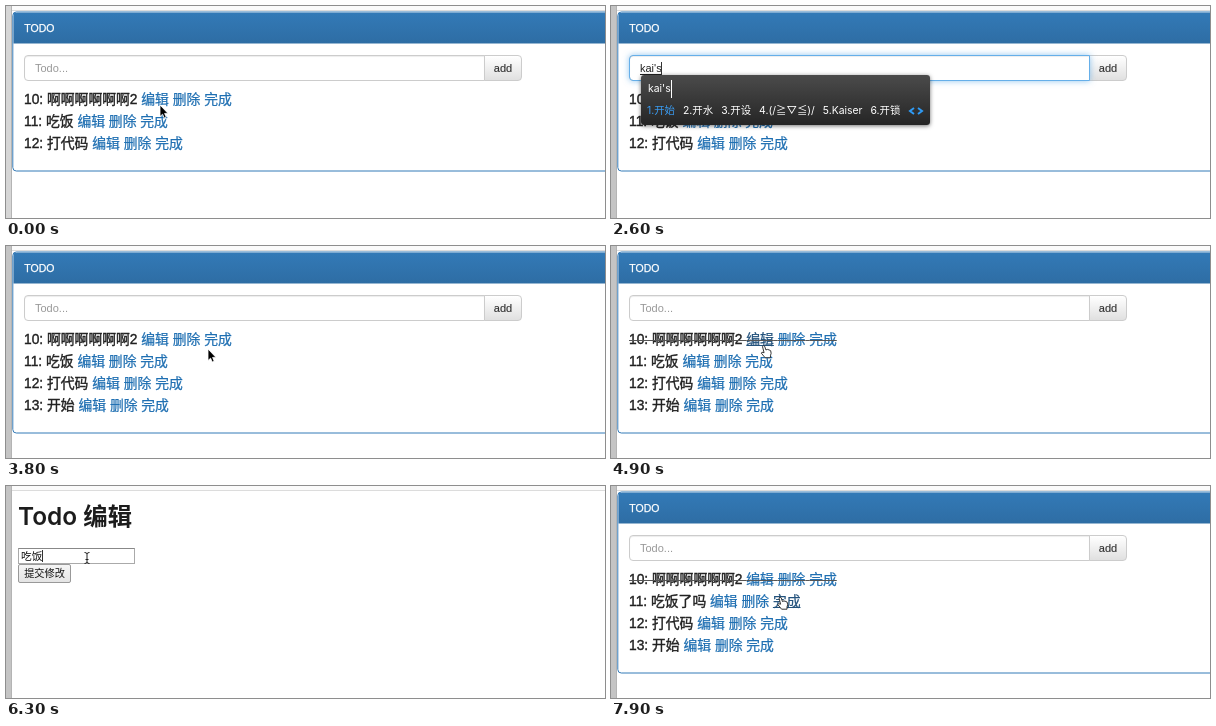
An HTML page for the animation above (8000 ms loop, 599x212 px).

```html
<!DOCTYPE html>
<html lang="zh">
<head>
<meta charset="utf-8">
<style>
html, body { margin: 0; width: 100%; height: 100%; overflow: hidden; background: #fff; }
#stage { position: relative; width: 599px; height: 212px; overflow: hidden;
  font: 11px "Liberation Sans", "Noto Sans CJK SC", sans-serif; color: #222; }
#stage * { box-sizing: border-box; white-space: pre; }
#stage > * { position: absolute; }
.side { left: 0; top: 0; width: 6px; height: 212px; border-right: 1px solid #b4b4b4; }
.top { left: 6px; top: 0; width: 593px; height: 5px; background: #fbfbfb; border-bottom: 1px solid #dcdcdc; }
.panel { left: 6px; top: 5px; width: 610px; border: 1px solid #337ab7; border-radius: 4px; overflow: hidden;
  transform: translate(.3px, .5px); }
.head { height: 31px; padding-left: 11px; font-size: 10.5px; line-height: 30px; color: #fff;
  -webkit-text-stroke: .25px; background: linear-gradient(#337ab7, #2e6da4); }
.input { left: 18px; top: 49px; width: 461px; height: 26px; padding-left: 10px; line-height: 25px;
  border: 1px solid #ccc; border-radius: 4px 0 0 4px; background: #fff; box-shadow: inset 0 1px 1px rgba(0,0,0,.075); }
.glow { left: 18px; top: 49px; width: 461px; height: 26px; border: 1px solid #66afe9;
  border-radius: 4px 0 0 4px; box-shadow: 0 0 6px rgba(102,175,233,.7); }
.add { left: 478px; top: 49px; width: 38px; height: 26px; line-height: 25px; text-align: center; color: #333;
  -webkit-text-stroke: .15px; border: 1px solid #ccc; border-radius: 0 4px 4px 0;
  background: linear-gradient(#fff, #e0e0e0); }
.row { left: 18px; font-size: 13.8px; line-height: 22px; -webkit-text-stroke: .4px; }
.done { text-decoration: line-through 1px #555; }
.row a { color: #1f6fb2; -webkit-text-stroke: .25px; }
.row a.over { color: #23527c; text-decoration: underline 1px; }
.hint { color: #999; }
u { text-decoration: underline 1px; text-underline-offset: 2px; }
.caret { width: 1px; background: #333; }
h1 { left: 12px; top: 15px; margin: 0; font: 600 24.4px/30px Inter, "Noto Sans CJK SC", sans-serif; color: #1c1c1c; }
.field { left: 12px; top: 62px; width: 117px; height: 16px; padding-left: 2px; font-size: 10.7px; line-height: 14px;
  border: 1px solid #aaa; border-top-color: #888; color: #111; }
.send { left: 12px; top: 78px; width: 53px; height: 19px; font-size: 10.2px; line-height: 17px; text-align: center;
  border: 1px solid #999; border-radius: 2px; background: linear-gradient(#f5f5f5, #e4e4e4); color: #111; }
.ime { height: 50px; padding: 0 6px; border-radius: 3px; color: #fff; background: linear-gradient(#4b4b4b, #252525);
  box-shadow: 0 1px 4px rgba(0,0,0,.55); font: 10.4px Inter, "Noto Sans CJK SC", sans-serif; }
.ime p { margin: 0; height: 23px; line-height: 27px; padding-left: 1px; }
.ime i { display: inline-block; width: 1px; height: 18px; background: #fff; vertical-align: middle; }
.ime div { display: flex; gap: 8px; line-height: 25px; }
.ime div :first-child { color: #3a9cf2; }
.ime svg { width: 16px; height: 10px; margin-top: 8px; }
#stage > .mouse { left: 0; top: 0; width: 599px; height: 212px; }
</style>
</head>
<body>
<div id="stage"></div>
<script>
const stage = document.getElementById('stage');
const LOOP = 8000, STEP = 100;
const LINKS = ['编辑', '删除', '完成'];

// Typed letters and their candidates
const TYPING = [
  [0, ''],
  [2000, 'k', '看 可 卡 快 开 口'],
  [2100, 'ka', '卡 咖 喀 咔 看 开'],
  [2400, 'kai', '开 凯 楷 慨 开始 开心'],
  [2500, "kai's", '开始 开水 开设 (/≧▽≦)/ Kaiser 开锁'],
  [2700, "kai'sh", '开始 开水 开设 开山 开审 开'],
  [2800, "kai'shi", '开始 开市 开释 开 凯 楷'],
  [3000, ''],
  [6500, 'l', '了 来 里 老 两'],
  [6600, 'le', '了 乐 勒 雷 了吗'],
  [6700, "le'ma", '了吗 了嘛 乐 了 勒'],
  [6900, '']
];

// Time, position, pointer: a = arrow, i = text beam, h + row + link = hand
const PATH = [
  [0, 154, 99, 'a'], [400, 157, 106, 'a'], [800, 160, 97, 'h00'], [1000, 163, 82, 'a'],
  [1100, 165, 73, 'i'], [1300, 166, 67, 'i'], [2000, 166, 67, ''], [3400, 174, 76, 'a'],
  [3800, 202, 103, 'a'], [4000, 208, 98, 'h02'], [4400, 208, 97, 'h02'], [4600, 185, 98, 'h01'],
  [4800, 153, 99, 'h00'], [5100, 151, 101, 'a'], [5400, 120, 110, 'h11'], [5600, 92, 111, 'h10'],
  [6000, 88, 110, 'a'], [6200, 81, 72, 'i'], [6500, 81, 72, ''], [7000, 81, 72, 'i'],
  [7100, 62, 80, 'a'], [7300, 42, 87, 'a'], [7500, 50, 92, 'a'], [7800, 169, 111, 'h12'], [8000, 169, 111, 'h12']
];
const CLICKS = [1300, 4200, 5800, 6200, 7300];

const POINTERS = {
  a: '<path d="M0 0V11.5L2.6 9.2 4.2 13 6.2 12.2 4.6 8.4H8Z" fill="#000" stroke="#fff" stroke-width=".8"/>',
  i: '<path d="M-2.5-5.5Q0-5.5 0-4Q0-5.5 2.5-5.5M0-4V4M-2.5 5.5Q0 5.5 0 4Q0 5.5 2.5 5.5M-1.5 1.5H1.5" fill="none" stroke="#222"/>',
  h: '<path d="M-1 1Q0-.6 1.2.8L2.4 4.4 4 3.9 5.6 4.4 7.2 5.2Q8.2 8 7 10V12.2H1.6L-2.2 7.6Q-2.2 6 .6 7.2Z" ' +
     'fill="#fff" stroke="#222" stroke-width=".9" stroke-linejoin="round"/>'
};

const last = (list, t) => list.findLastIndex(e => e[0] <= t);
const div = (cls, style, body = '') => `<div class="${cls}" style="${style}">${body}</div>`;
const caret = (x, y, h) => div('caret', `left:${x}px;top:${y}px;height:${h}px`);

const ruler = document.createElement('canvas').getContext('2d');
function textWidth(text, size) {
  ruler.font = `${size}px "Liberation Sans", "Noto Sans CJK SC", sans-serif`;
  return ruler.measureText(text).width;
}

function pointer(t) {
  const k = last(PATH, t), [t0, x0, y0, kind] = PATH[k];
  const [t1, x1, y1] = PATH[k + 1] || PATH[k];
  const p = t1 > t0 ? (t - t0) / (t1 - t0) : 0, e = p * p * (3 - 2 * p);
  return { x: x0 + (x1 - x0) * e, y: y0 + (y1 - y0) * e, kind };
}

function drawPointer({ x, y, kind }, t) {
  if (!kind) return '';
  const ring = CLICKS.some(c => t >= c && t < c + STEP)
    ? '<circle r="12.7" fill="none" stroke="#111" stroke-width="1.2"/>' : '';
  return `<svg class="mouse"><g transform="translate(${x} ${y})">${ring}${POINTERS[kind[0]]}</g></svg>`;
}

function ime(x, y, [, letters, words]) {
  if (!letters) return '';
  const items = words.split(' ').map((w, i) => `<span>${i + 1}.${w}</span>`).join('');
  const arrows = '<svg><path d="M6 2 2 5 6 8M10 2 14 5 10 8" fill="none" stroke="#2f9bf5" stroke-width="2"/></svg>';
  return div('ime', `left:${x}px;top:${y}px`, `<p>${letters}<i></i></p><div>${items}${arrows}</div>`);
}

function listPage(t, typed, hover) {
  const added = t >= 3300, focus = t >= 1300 && !added;
  const glow = focus ? Math.min(1, (t - 1300) / 200) : 0;
  const text = t >= 3000 && !added ? '开始' : typed[1];
  const rows = ['啊啊啊啊啊啊2', t >= 7500 ? '吃饭了吗' : '吃饭', '打代码'];
  if (added) rows.push('开始');

  let out = div('panel', `height:${added ? 182 : 160}px`, div('head', '', 'TODO'));
  out += div('input', '', text ? (typed[1] ? `<u>${text}</u>` : text) : '<span class="hint">Todo...</span>');
  out += div('add', '', 'add') + div('glow', `opacity:${glow}`);
  if (focus && !(t >= 1800 && t < 2000)) out += caret(28.5 + textWidth(text, 11), 56, 13);
  rows.forEach((name, r) => {
    const links = LINKS.map((s, i) => `<a${hover === `h${r}${i}` ? ' class="over"' : ''}>${s}</a>`).join(' ');
    out += div(r === 0 && t >= 4300 ? 'row done' : 'row', `top:${83 + 22 * r}px`, `${10 + r}: ${name} ${links}`);
  });
  return out + ime(30, 69, typed);
}

function editPage(t, typed) {
  const text = t >= 6900 ? '吃饭了吗' : '吃饭';
  return '<h1>Todo 编辑</h1>' + div('field', '', `${text}<u>${typed[1]}</u>`) + div('send', '', '提交修改') +
    (t >= 6200 ? caret(15 + textWidth(text + typed[1], 10.7), 64, 12) : '') + ime(38, 79, typed);
}

function render(t) {
  const mouse = pointer(t), typed = TYPING[last(TYPING, t)];
  const editing = t >= 6000 && t < 7500;
  stage.innerHTML = div('side', `background:${t < 1000 ? '#d6d6d6' : '#c4c4c4'}`) + div('top', '') +
    (editing ? editPage(t, typed) : listPage(t, typed, mouse.kind)) + drawPointer(mouse, t);
}

let shown = -1;
const start = performance.now();
function tick() {
  const t = Math.floor((performance.now() - start) % LOOP / STEP) * STEP;
  if (t !== shown) render(shown = t);
  requestAnimationFrame(tick);
}
tick();
</script>
</body>
</html>
```
